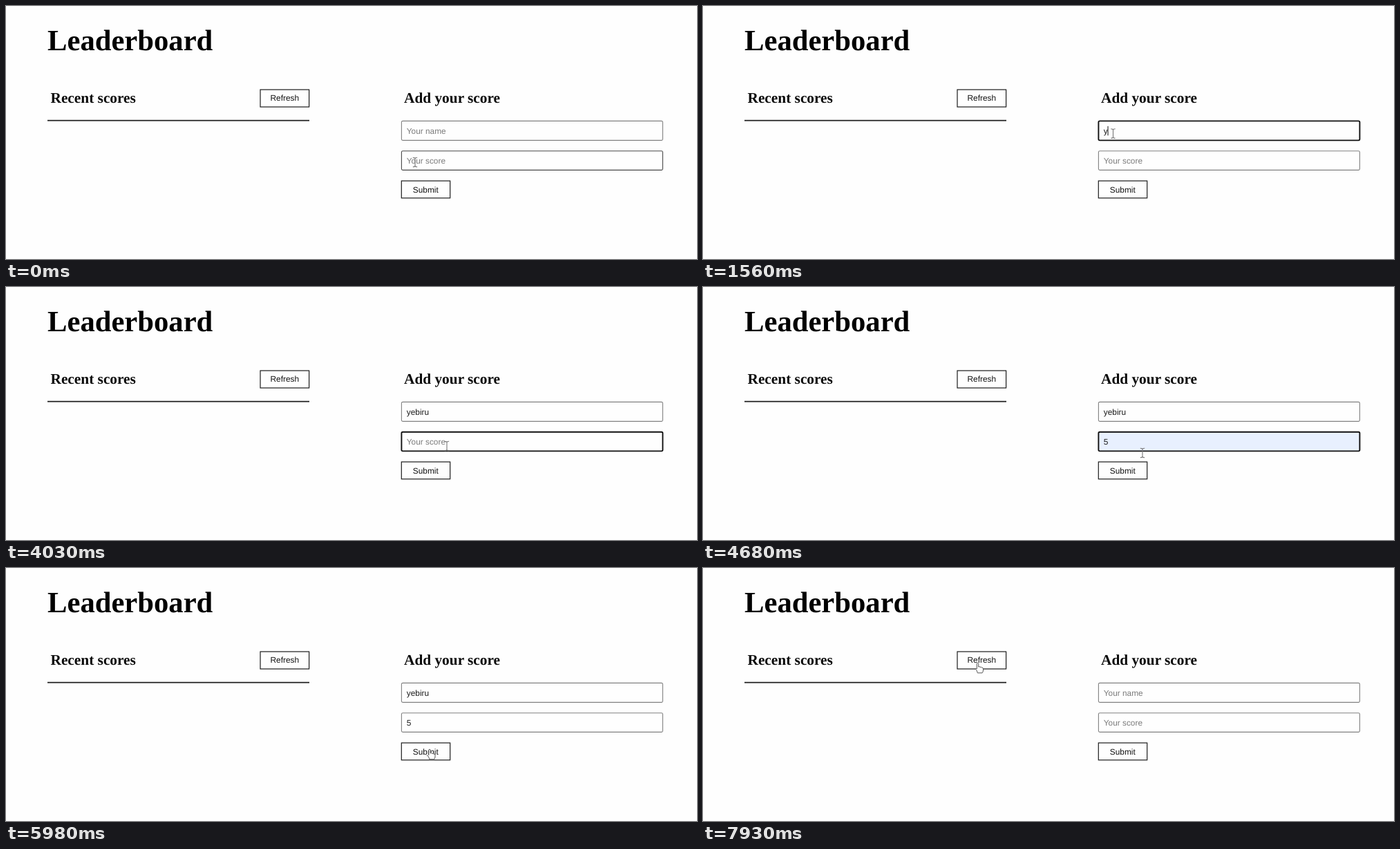
Animation, 1000 px wide and 366 px high, one loop 8 s. Source, as an HTML page:

```html
<!DOCTYPE html>
<html lang="en">
<head>
<meta charset="utf-8">
<title>Leaderboard</title>
<style>
  html, body { margin: 0; width: 100%; height: 100%; overflow: hidden; background: #fefefe; }
  svg { display: block; width: 100%; height: 100%; }
  text { font: 11.85px "Liberation Sans", Arial, sans-serif; fill: #111; text-rendering: geometricPrecision; }
  .title { font: bold 42.67px "Liberation Serif", "Times New Roman", serif; fill: #000; }
  .heading { font: bold 21.33px "Liberation Serif", "Times New Roman", serif; fill: #0a0a0a; }
  .button { fill: #fefefe; stroke: #1c1c1c; stroke-width: 1.2; }
  .label { text-anchor: middle; }
  .pointer { fill: #fff; stroke: #555; stroke-width: 1; stroke-linejoin: round; }
  .beam { fill: none; stroke: #777; stroke-width: 1.1; }
</style>
</head>
<body>
<svg viewBox="0 0 1000 366">
  <text class="title" x="60" y="64.3">Leaderboard</text>

  <text class="heading" x="64.5" y="139.7">Recent scores</text>
  <rect class="button" x="368" y="121" width="70.6" height="25"/>
  <text class="label" x="403.3" y="137.4">Refresh</text>
  <rect x="60" y="164.8" width="379" height="1.7" fill="#1c1c1c"/>

  <text class="heading" x="576" y="139.7">Add your score</text>
  <rect id="nameBox" x="572.4" y="166.4" width="378" height="28" rx="1.8"/>
  <text id="nameText" x="579.8" y="184.5"></text>
  <rect id="scoreBox" x="572.4" y="209.8" width="378" height="27.6" rx="1.8"/>
  <text id="scoreText" x="579.8" y="228"></text>
  <rect class="button" x="572.3" y="253" width="70.4" height="24.8"/>
  <text class="label" x="607.3" y="269.6">Submit</text>

  <rect id="caret" width="1" height="13.5" fill="#111"/>
  <g id="cursor">
    <path id="beam" class="beam" d="M-3.2-6.8Q0-6.8 0-5Q0-6.8 3.2-6.8M0-5V5M-3.2 6.8Q0 6.8 0 5Q0 6.8 3.2 6.8"/>
    <path id="hand" class="pointer" d="M-3.2 1V-6.5Q-3.2-7.7-2-7.7T-.8-6.5V-2Q.9-3 1.5-1.6Q3.2-2.4 3.8-.9Q6-1.4 6 .8V3Q6 5 4.6 6.8H-2.2Q-4-.0-6.2 1.4-6.6-.2Q-5.4-1.4-3.2 1Z"/>
    <path id="arrow" class="pointer" d="M-3-7V5L-.2 2.4L1.8 7L3.7 6.2L1.8 1.8H5.5Z"/>
  </g>
</svg>
<script>
const LOOP = 8000, STEP = 130;
const PLAYER = "yebiru";
const KEY_TIMES = [1560, 1690, 1950, 2080, 2210, 2470];
const CARET_ON = [[520, 1040], [1560, 2990], [3510, 4030], [4940, 5460]];
const FOCUS_NAME = 520, FOCUS_SCORE = 3510, FILL_SCORE = 4420, PLAIN_SCORE = 5590,
      PRESS_SUBMIT = 5980, RESET = 6890;

// [time, x, y] of the mouse cursor
const PATH = [
  [0, 592, 226], [520, 593.5, 184.5], [2600, 593.5, 184.5], [2730, 610.5, 186],
  [3510, 638, 230], [4290, 638, 230], [4680, 636, 240], [4810, 636, 240],
  [5590, 626, 289], [5850, 626, 289], [5980, 615, 270], [7150, 615, 270], [7930, 399.5, 145],
];

const $ = id => document.getElementById(id);
const within = (t, from, to) => t >= from && t < to;
const show = (id, visible) => $(id).setAttribute("visibility", visible ? "visible" : "hidden");

function cursorAt(t) {
  const next = PATH.findIndex(point => point[0] > t);
  if (next < 0) return PATH[PATH.length - 1].slice(1);
  const [t0, x0, y0] = PATH[next - 1], [t1, x1, y1] = PATH[next];
  const u = (t - t0) / (t1 - t0), k = u * u * (3 - 2 * u);
  return [x0 + (x1 - x0) * k, y0 + (y1 - y0) * k];
}

function cursorShape(x, y) {
  const over = (left, top, right, bottom) => x > left && x < right && y > top && y < bottom;
  if (over(572, 162, 951, 198) || over(572, 206, 951, 242)) return "beam";
  if (over(572, 253, 643, 284) || over(368, 121, 439, 152)) return "hand";
  return "arrow";
}

function drawField(id, value, placeholder, focused, border, fill) {
  const box = $(id + "Box"), text = $(id + "Text");
  box.setAttribute("fill", fill);
  box.setAttribute("stroke", focused ? "#101010" : border);
  box.setAttribute("stroke-width", focused ? 1.9 : 1.1);
  text.textContent = value || placeholder;
  text.style.fill = value ? "#1a1a1a" : "#7b7b7b";
}

function draw(time) {
  const t = Math.floor(time / STEP) * STEP;
  const onName = within(t, FOCUS_NAME, FOCUS_SCORE);
  const onScore = within(t, FOCUS_SCORE, PRESS_SUBMIT);
  const name = t < RESET ? PLAYER.slice(0, KEY_TIMES.filter(k => k <= t).length) : "";
  const score = within(t, FILL_SCORE, RESET) ? "5" : "";
  const scoreFill = within(t, FILL_SCORE, PLAIN_SCORE) ? "#e8f0fe" : "#fefefe";

  drawField("name", name, "Your name", onName, "#808080", "#fefefe");
  drawField("score", score, "Your score", onScore, t < 260 ? "#484848" : "#808080", scoreFill);

  const field = onName ? "name" : "score", value = onName ? name : score;
  const width = value ? $(field + "Text").getComputedTextLength() : 0;
  $("caret").setAttribute("x", 579.6 + width);
  $("caret").setAttribute("y", onName ? 173.8 : 217.2);
  show("caret", CARET_ON.some(([from, to]) => within(t, from, to)));

  const [x, y] = cursorAt(t), shape = cursorShape(x, y);
  $("cursor").setAttribute("transform", `translate(${x} ${y})`);
  for (const id of ["beam", "hand", "arrow"]) show(id, id === shape);
}

const start = performance.now();
function frame() {
  draw((performance.now() - start) % LOOP);
  requestAnimationFrame(frame);
}
frame();
</script>
</body>
</html>
```
